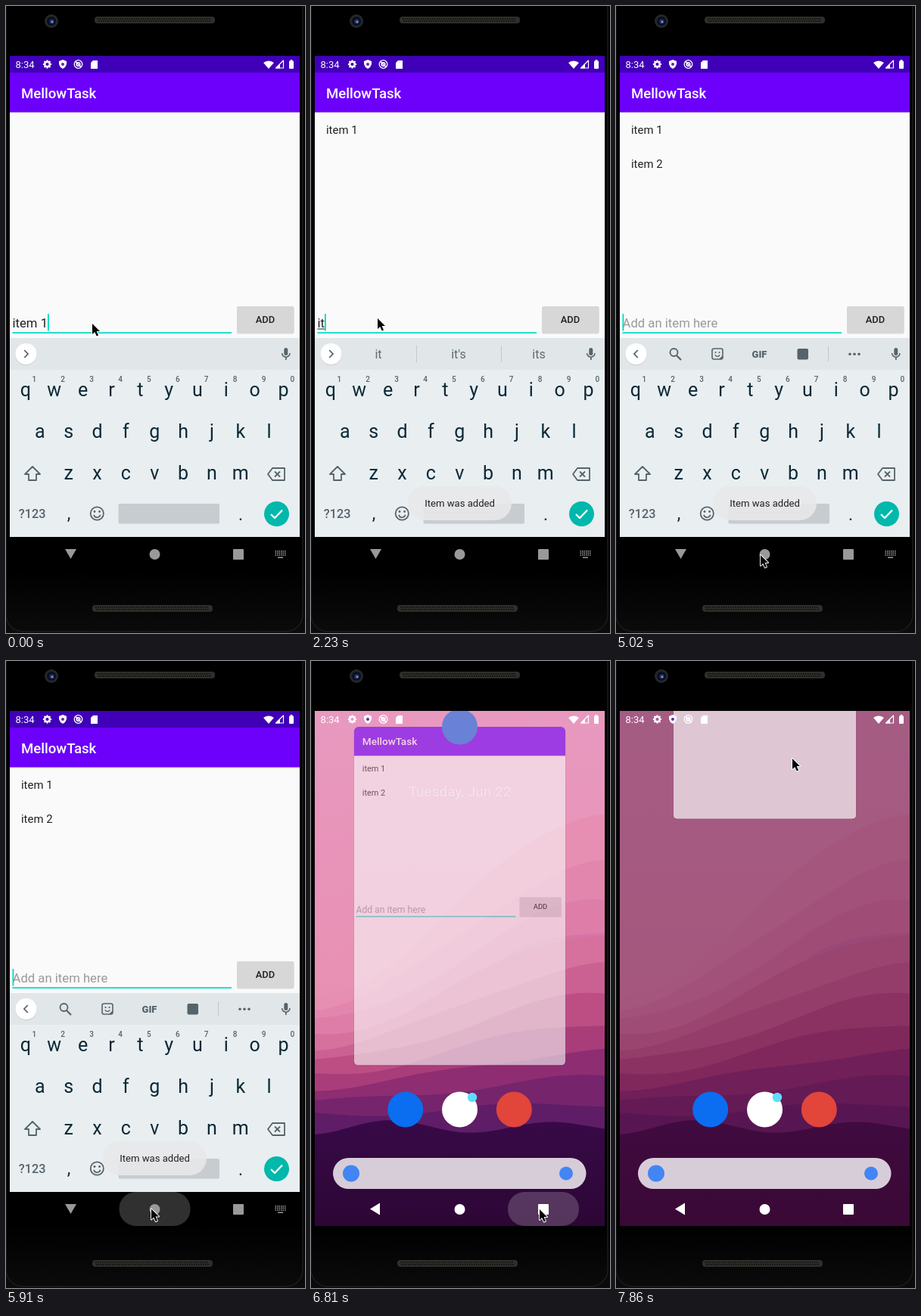
Animation, 395 px wide and 829 px high, one loop 8 s. Source, as an HTML page with a canvas:

```html
<!DOCTYPE html>
<html lang="en">
<head>
<meta charset="utf-8">
<title>To-do list on a phone</title>
<style>
html, body { margin: 0; width: 100%; height: 100%; overflow: hidden; background: #000; }
canvas { display: block; width: 395px; height: 829px; }
</style>
</head>
<body>
<canvas id="stage"></canvas>
<script>
const W = 395, H = 829, LOOP = 8000;
const TICK = 147.9; // the screen refreshes once per tick; all times below are in ticks
const TITLE = 'MellowTask';
const dpr = window.devicePixelRatio || 1;
const canvas = document.getElementById('stage');
const buffer = document.createElement('canvas');
for (const c of [canvas, buffer]) {
  c.width = W * dpr;
  c.height = H * dpr;
}
const screen2d = canvas.getContext('2d'), buffer2d = buffer.getContext('2d');
let g = screen2d;

// Script of the session
const ADDS = [7, 28], KEYS = [13, 15, 16, 17, 18, 21];
const GO_HOME = 41, OVERVIEW = 46;
const glides = [
  [1, 5, 371, 411], [7, 10, 88, 413], [21, 24, 345, 411], [29, 33, 191, 726],
  [39, 41, 193, 723], [43, 45, 302, 725], [46, 49, 229, 471], [51, 53, 233, 129]
];

const clamp = k => Math.min(1, Math.max(0, k));
const smooth = k => k * k * (3 - 2 * k);
const mix = (a, b, k) => a + (b - a) * k;
// What is left of a decelerating move
const remaining = (n, start, span) => (1 - clamp((n - start) / span)) ** 2;
// A touch highlight that dies away
const glow = age => age < 0 ? 0 : clamp(1 - age / 4);
const toastAlpha = age => clamp(Math.min((age + 1) / 2, (15 - age) / 2));

function pointerAt(n) {
  let x = 114, y = 420;
  for (const [from, to, tx, ty] of glides) {
    const k = smooth(clamp((n - from) / (to - from)));
    x = mix(x, tx, k);
    y = mix(y, ty, k);
  }
  return [x, y];
}

function stateAt(n) {
  const added = ADDS.filter(a => a <= n).length;
  const typed = added === 1 ? 'item 2'.slice(0, KEYS.filter(k => k <= n).length) : added ? '' : 'item 1';
  const edit = Math.max(0, ...[...ADDS, ...KEYS].filter(e => e <= n));
  return {
    typed,
    items: ['item 1', 'item 2'].slice(0, added),
    caret: n < OVERVIEW && Math.floor((n - edit) / 3) % 2 === 0,
    press: Math.max(...ADDS.map(a => glow(n - a + 1))),
    toast: Math.max(...ADDS.map(a => toastAlpha(n - a)))
  };
}

// Drawing helpers
function rect(x, y, w, h, fill, r = 0) {
  g.fillStyle = fill;
  g.beginPath();
  g.roundRect(x, y, w, h, r);
  g.fill();
}
function frame(x, y, w, h, color, width, r) {
  g.strokeStyle = color;
  g.lineWidth = width;
  g.beginPath();
  g.roundRect(x, y, w, h, r);
  g.stroke();
}
function disc(x, y, r, fill) {
  g.fillStyle = fill;
  g.beginPath();
  g.arc(x, y, r, 0, 7);
  g.fill();
}
function arc(x, y, r, color, w, from = 0, to = 2 * Math.PI) {
  g.strokeStyle = color;
  g.lineWidth = w;
  g.beginPath();
  g.arc(x, y, r, from, to);
  g.stroke();
}
function trace(pts, close) {
  g.beginPath();
  for (let i = 0; i < pts.length; i += 2) g.lineTo(pts[i], pts[i + 1]);
  if (close) g.closePath();
}
function poly(fill, ...pts) {
  trace(pts, true);
  g.fillStyle = fill;
  g.fill();
}
function line(color, w, ...pts) {
  trace(pts);
  g.strokeStyle = color;
  g.lineWidth = w;
  g.stroke();
}
function outline(color, w, ...pts) {
  trace(pts, true);
  g.strokeStyle = color;
  g.lineWidth = w;
  g.lineJoin = 'round';
  g.stroke();
}
function text(s, x, y, size, color, align = 'left', weight = 400) {
  g.font = `${weight} ${size}px Roboto, sans-serif`;
  g.textAlign = align;
  g.fillStyle = color;
  g.fillText(s, x, y);
}
// Draws a group that fades as a whole
function layer(alpha, draw) {
  if (alpha <= 0) return;
  g = buffer2d;
  g.setTransform(dpr, 0, 0, dpr, 0, 0);
  g.clearRect(0, 0, W, H);
  g.save();
  draw();
  g.restore();
  g = screen2d;
  g.globalAlpha = alpha;
  g.drawImage(buffer, 0, 0, W, H);
  g.globalAlpha = 1;
}
function gradient(y0, y1, top, bottom) {
  const fill = g.createLinearGradient(0, y0, 0, y1);
  fill.addColorStop(0, top);
  fill.addColorStop(1, bottom);
  return fill;
}

function grille(x, y) {
  rect(x, y, 159, 9, '#2e2e2b', 4);
  for (let i = 4; i < 154; i += 3) {
    rect(x + i, y + 2, 1.5, 2, '#11110f');
    rect(x + i + 1, y + 5, 1.5, 2, '#11110f');
  }
}
function phone() {
  rect(0, 0, W, H, '#000');
  rect(0, 745, W, H - 745, gradient(745, H, '#000', '#0b0b0b'));
  frame(0, -40, 392, 867, '#1c1c1c', 1.5, 22);
  disc(60, 20, 9, '#25272a');
  disc(60, 20, 6, '#0c0e1c');
  disc(60.5, 20.5, 3, '#273a78');
  disc(61, 21, 1.2, '#8da4e0');
  grille(117, 14);
  grille(114, 792);
}

function statusBar() {
  const c = '#fff';
  text('8:34', 12.5, 82, 13, c);
  arc(54.5, 77, 3.3, c, 2.4);
  for (let i = 0; i < 8; i++) {
    const a = i * Math.PI / 4, u = Math.cos(a), v = Math.sin(a);
    line(c, 2, 54.5 + u * 4, 77 + v * 4, 54.5 + u * 5.6, 77 + v * 5.6);
  }
  poly(c, 75, 71, 80, 73, 80, 77, 78, 81, 75, 83, 72, 81, 70, 77, 70, 73);
  disc(75, 77, 2, '#5b2ca0');
  arc(95.5, 77, 5.3, c, 1.3);
  arc(95.5, 77, 2.3, c, 1.6);
  line(c, 1.6, 92, 73.5, 99, 80.5);
  poly(c, 115, 72, 121, 72, 121, 83, 112, 83, 112, 75);
  g.beginPath();
  g.moveTo(347, 83);
  g.arc(347, 83, 10.5, -Math.PI * .73, -Math.PI * .27);
  g.fill();
  outline(c, 1.2, 356.5, 82, 366.5, 82, 366.5, 72);
  poly(c, 356, 82.5, 362, 76.5, 362, 82.5);
  rect(374, 72.5, 6, 10.5, c, 1);
  rect(375.7, 71, 2.6, 2, c);
}

function navBar(color, home) {
  if (home) poly(color, 78, 724.5, 91, 716.5, 91, 732.5);
  else poly(color, 78, 718, 93, 718, 85.5, 731);
  disc(196.5, 725, 7, color);
  rect(300, 718, 14, 14, color, 1);
  if (home) return;
  for (let row = 0; row < 3; row++)
    for (let i = 0; i < 6; i++) rect(355.5 + i * 2.5, 720 + row * 2.6, 1.5, 1.6, color);
  rect(359, 728.5, 7, 1.5, color);
}
const navGlow = (x, alpha) => rect(x - 47, 702, 94, 45, `rgba(255,255,255,${alpha})`, 22);

// Application page, without the keyboard
function page(s) {
  const size = 16.7, ink = '#212121', teal = '#03dac5';
  rect(5, 140, 383, 562, '#fafafa');
  rect(5, 88, 383, 52.5, '#6c00fa');
  rect(5, 140.5, 383, 1, 'rgba(0,0,0,.12)');
  text(TITLE, 20, 121.5, 18.6, '#fff', 'left', 500);
  s.items.forEach((item, i) => text(item, 20, 168.5 + i * 45, 14.9, ink));
  text(s.typed || 'Add an item here', 8.5, 425, size, s.typed ? ink : '#9a9a9a');
  const width = s.typed ? g.measureText(s.typed).width : 0;
  if (/^[a-z]+$/.test(s.typed)) rect(8.5, 426.5, width, 1, ink);
  if (s.caret) rect(8.5 + width, 407, 1.8, 22.5, teal);
  rect(8.5, 431.3, 289.5, 1.8, teal);
  const shade = 215 - 26 * s.press;
  rect(305, 398, 75.5, 35.5, 'rgba(0,0,0,.13)', 2);
  rect(305, 397, 75.5, 35, `rgb(${shade},${shade},${shade})`, 2);
  text('ADD', 342.5, 419, 12.9, ink, 'center', 500);
}

const INK = '#0b2936', GREY = '#55646b', RULE = '#c2c8cb';
function suggestions(typed) {
  if (/\d/.test(typed)) return;
  const words = typed.endsWith(' ') ? ['is', 'in', 'and'] : [typed, typed + "'s", typed + 's'];
  words.forEach((w, i) => text(w, 89 + i * 106, 466, 16, '#5f6a70', 'center'));
  for (const x of [139, 251]) rect(x, 449, 1, 22, RULE);
}
function tools() {
  arc(76.5, 458, 5, GREY, 1.8);
  line(GREY, 2.2, 80, 462, 86, 468);
  frame(127, 453, 14, 14, GREY, 1.6, 2.5);
  poly(GREY, 141, 462, 141, 467, 136, 467);
  disc(131.5, 458, 1.1, GREY);
  disc(136.5, 458, 1.1, GREY);
  arc(134, 460, 3.3, GREY, 1.3, .4, Math.PI - .4);
  text('GIF', 189.5, 464.8, 13, GREY, 'center', 900);
  rect(239.5, 453, 14.5, 14.5, GREY, 2);
  rect(280, 450, 1, 20, RULE);
  for (let i = -1; i < 2; i++) disc(315 + i * 6, 460.3, 1.8, GREY);
}
function keyboard(typed) {
  rect(5, 481, 383, 221, '#e9eef1');
  rect(5, 439, 383, 42, '#e1e6e9');
  disc(26.5, 461, 14.3, '#cdd2d5');
  disc(26.5, 460, 14, '#fff');
  const d = typed ? 1 : -1;
  line(GREY, 1.8, 26.5 - 2.3 * d, 455, 26.5 + 2.5 * d, 460, 26.5 - 2.3 * d, 465);
  rect(367.3, 452, 5, 10, GREY, 2.5);
  arc(369.8, 459, 5.2, GREY, 1.6, 0, Math.PI);
  rect(369, 464, 1.7, 4, GREY);
  if (typed) suggestions(typed);
  else tools();

  ['qwertyuiop', 'asdfghjkl', 'zxcvbnm'].forEach((letters, row) => {
    const first = 196.2 - (letters.length - 1) * 18.93;
    [...letters].forEach((c, i) => text(c, first + i * 37.86, 516 + row * 55, 25, INK, 'center'));
  });
  for (let i = 0; i < 10; i++) text((i + 1) % 10, 37.3 + i * 37.9, 497.3, 10, GREY, 'center', 500);
  outline(GREY, 1.8, 35, 609, 45, 619, 40, 619, 40, 627, 30, 627, 30, 619, 25, 619);
  outline(GREY, 1.8, 346, 619, 352, 611, 368, 611, 368, 627, 352, 627);
  line(GREY, 1.8, 355, 615.5, 362, 622.5);
  line(GREY, 1.8, 362, 615.5, 355, 622.5);
  text('?123', 34.7, 677, 16.3, GREY, 'center', 500);
  text(',', 83, 679, 23, INK, 'center');
  text('.', 310, 680, 23, INK, 'center');
  arc(120.3, 671, 8.6, GREY, 1.8);
  disc(117, 668.5, 1.4, GREY);
  disc(123.6, 668.5, 1.4, GREY);
  arc(120.3, 671.7, 4.5, GREY, 1.8, .25, Math.PI - .25);
  rect(148.5, 658, 133.5, 26.5, '#c7ccd0', 2);
  disc(357.5, 671.5, 16.5, '#00b8ab');
  line('#fff', 2.3, 350, 672, 355, 677, 365, 666.5);
}

// Fills everything below the curve y(x) on the wallpaper
function below(fill, y, from = 5) {
  g.fillStyle = fill;
  g.beginPath();
  g.moveTo(from, 747);
  for (let x = from; x <= 388; x += 3) g.lineTo(x, y(x));
  g.lineTo(388, y(388));
  g.lineTo(388, 747);
  g.fill();
}
const dusk = [[254, 162, 198], [245, 146, 187], [228, 118, 165], [200, 80, 138], [145, 47, 120], [98, 32, 110]];
function duskColor(k) {
  const p = k * (dusk.length - 1), i = Math.min(dusk.length - 2, Math.floor(p));
  return `rgb(${dusk[i].map((v, j) => mix(v, dusk[i + 1][j], p - i))})`;
}
function wallpaper(dim) {
  const BANDS = 10;
  rect(5, 66, 383, 681, gradient(66, 480, '#ffaed3', '#ffa3c5'));
  for (let i = 0; i < BANDS; i++) {
    const k = i / (BANDS - 1);
    const left = 440 + 160 * k, right = 200 + 385 * k ** .8;
    below(duskColor(k), x => mix(left, right, smooth((x - 5) / 383)) + 4 * Math.sin(x / 45 + i * 2));
    if (i === 2) below('#e985b5', x => 358 + 85 * Math.exp((215 - x) / 45), 215);
  }
  below(gradient(600, 747, '#350a4b', '#280635'),
    x => 616 + (10 - x / 90) * Math.cos(x * 2 * Math.PI / 213));
  rect(5, 66, 383, 681, `rgba(77,12,55,${dim})`);
}

function homeScreen(n, leaving) {
  const rest = remaining(n, GO_HOME, 2);
  const opened = n >= OVERVIEW;
  layer(opened ? .4 * leaving : 1 - .4 * rest, () => {
    g.shadowColor = 'rgba(90,30,70,.45)';
    g.shadowBlur = 2;
    text('Tuesday, Jun 22', 196.5, opened ? 179 : 149 - 20 * rest, opened ? 19 : 23.3, '#fff', 'center');
  });
  layer(1 - .4 * rest, () => {
    g.translate(0, -20 * rest);
    ['#0b6df0', '#fff', '#e2453a'].forEach((c, i) => disc(124.7 + i * 71.8, 593, 23.5, c));
    disc(213, 577, 6.2, '#5fdcfb');
    rect(29, 657, 334.5, 41, 'rgba(231,226,232,.91)', 20.5);
    disc(53, 677.5, 11, '#4285f4');
    disc(337, 677.5, 9, '#4285f4');
  });
}

// Card in the overview; it follows the pointer once dragged
function recentCard(n, s, leaving, pointerY) {
  const drag = n > 50 ? Math.min(0, pointerY - 425) : 0;
  const scale = .63 + .099 * leaving;
  layer(1 - .4 * leaving + drag / 925, () => {
    g.translate(196.5, 118 - 31 * leaving + drag);
    g.scale(scale, scale);
    g.translate(-196.5, -88);
    rect(4, 91, 385, 613, 'rgba(40,0,30,.12)', 9);
    g.beginPath();
    g.roundRect(5, 88, 383, 614, 8);
    g.save();
    g.clip();
    page(s);
    g.restore();
    disc(196.5, 88, 32.3, '#1673e6');
  });
}

function pointer(x, y) {
  const arrow = [0, 0, 0, 14, 3.2, 11, 5.8, 16.6, 8, 15.6, 5.6, 10, 10, 10];
  g.save();
  g.translate(x, y);
  outline('#fff', 1.8, ...arrow);
  poly('#000', ...arrow);
  g.restore();
}

function draw(n) {
  const s = stateAt(n), [px, py] = pointerAt(n);
  const home = n >= GO_HOME, overview = n >= OVERVIEW;
  const leaving = remaining(n, OVERVIEW, 3);
  phone();
  g.save();
  g.beginPath();
  g.rect(5, 66, 383, 681);
  g.clip();
  if (home) {
    wallpaper(overview ? .5 - .37 * leaving : 0);
    homeScreen(n, leaving);
    if (overview) recentCard(n, s, leaving, py);
    navGlow(307, .25 * glow(n - OVERVIEW + 1));
  } else {
    rect(5, 66, 383, 22, '#4000b8');
    page(s);
    keyboard(s.typed);
    rect(5, 702, 383, 45, '#000');
    navGlow(196.5, .25 * glow(n - GO_HOME + 2));
  }
  statusBar();
  navBar(home ? '#fff' : '#999', home);
  layer(s.toast, () => {
    rect(128, 635, 137, 45, 'rgba(232,232,233,.9)', 22.5);
    text('Item was added', 196.5, 662.3, 13.1, '#222', 'center');
  });
  g.restore();
  pointer(px, py);
}

function play() {
  const now = performance.now() % LOOP;
  g.setTransform(dpr, 0, 0, dpr, 0, 0);
  draw(Math.floor((now + 13) / TICK));
  requestAnimationFrame(play);
}
play();
</script>
</body>
</html>
```
